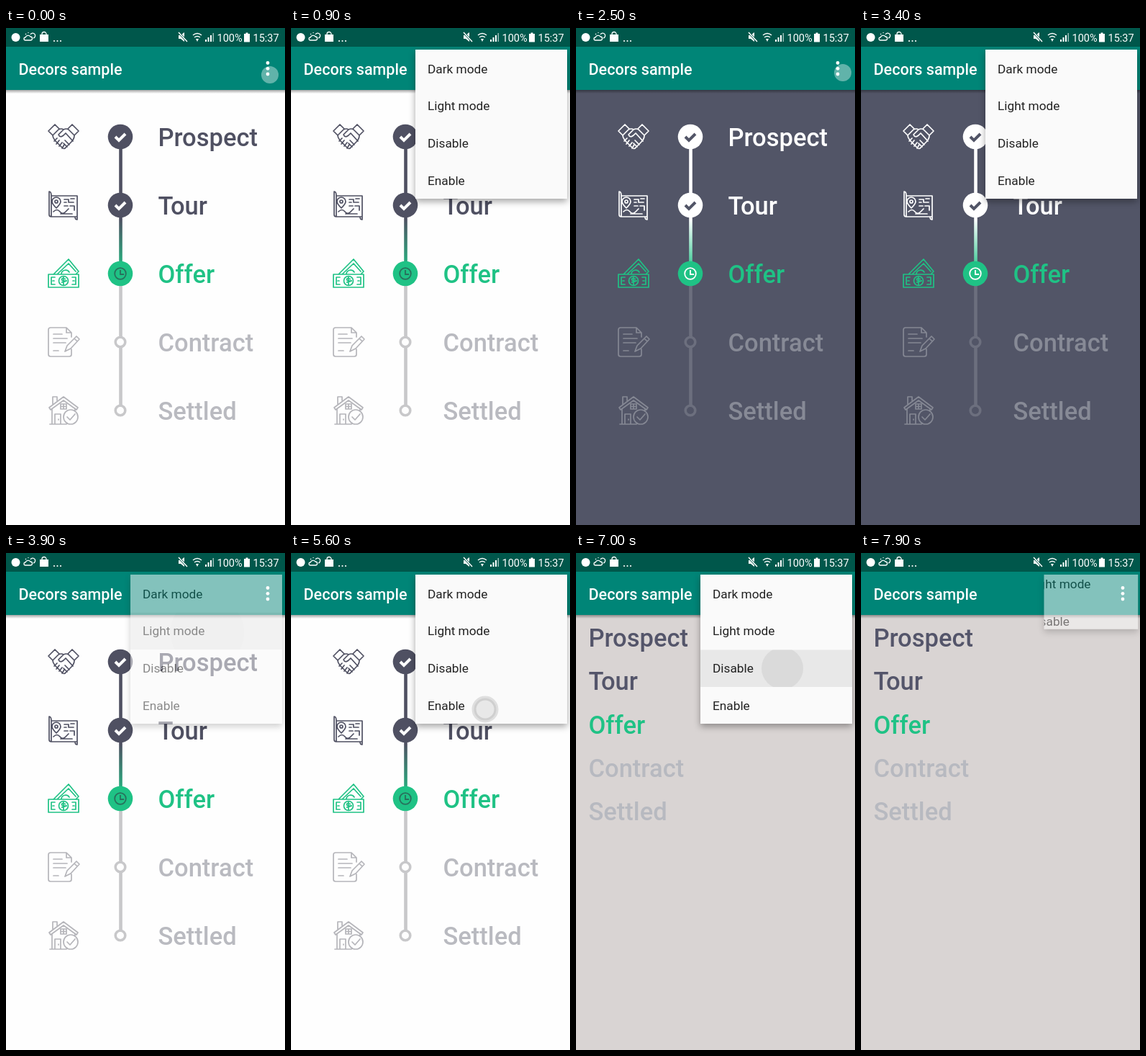
An HTML page that plays this animation: 388 by 690 pixels, repeating every 8000 ms.

```html
<!DOCTYPE html>
<html lang="en">
<head>
<meta charset="utf-8">
<title>Decors sample</title>
<style>
  html, body { margin: 0; width: 100%; height: 100%; overflow: hidden; }
  svg { display: block; width: 388px; height: 690px; font-family: Roboto, sans-serif; background: var(--bg); }
  .light { --bg: #fefefe; --fg: #4f5062; --check: #fff; --dim: #c8c8ca; --icon: #b5b5ba; --text: #b9bac0; --clock: #28705c; }
  .dark { --bg: #525567; --fg: #fff; --check: #525567; --dim: #6c6f7e; --icon: #858894; --text: #878a96; --clock: #fff; }
  .disabled { --bg: #d9d4d3; --fg: #54556a; --text: #b7b9c0; }
  .disabled #steps { display: none; }
  .label { font-size: 34.5px; font-weight: 500; }
  .icon { fill: none; stroke-width: 1.7; stroke-linejoin: round; stroke-linecap: round; }
  #menu { filter: drop-shadow(0 4px 5px rgba(0, 0, 0, .35)); }
  #items text { font-size: 17.25px; fill: #222; }
</style>
</head>
<body>
<svg id="stage" class="light" viewBox="0 0 388 690">
  <defs>
    <linearGradient id="blend" x2="0" y2="1">
      <stop offset=".2" stop-color="var(--fg)"/><stop offset="1" stop-color="#1fc285"/>
    </linearGradient>
    <linearGradient id="shade" x2="0" y2="1">
      <stop stop-opacity=".35"/><stop offset="1" stop-opacity="0"/>
    </linearGradient>
    <clipPath id="window"><rect id="frame" y="30"/></clipPath>
    <clipPath id="rowClip"><rect id="rowBox" x="173" width="211" height="51.75"/></clipPath>
  </defs>

  <g id="steps"></g>
  <g id="labels"></g>

  <rect y="86" width="388" height="5" fill="url(#shade)"/>
  <rect width="388" height="86" fill="#008577"/>
  <rect width="388" height="26" fill="#00574b"/>
  <text x="17.5" y="65" font-size="21.56" font-weight="500" fill="#fff">Decors sample</text>
  <g fill="#fff">
    <circle cx="364" cy="48.5" r="2.4"/><circle cx="364" cy="56.3" r="2.4"/><circle cx="364" cy="64" r="2.4"/>
    <circle cx="13.5" cy="13" r="6"/>
    <path d="M47 9h12v10h-12z"/>
    <path d="M50 10V8.500a3 3 0 0 1 6 0V10M27 17h7a2.500 2.500 0 0 0 0-5 4 4 0 0 0-7 1 2 2 0 0 0 0 4M34 9a3.500 3.500 0 1 1 4 5M27 8l1 1M31 6v1" fill="none" stroke="#fff" stroke-width="1.3"/>
    <circle cx="67" cy="18" r="1.1"/><circle cx="71.500" cy="18" r="1.1"/><circle cx="76" cy="18" r="1.1"/>
    <path d="M240 10h3l5-4v13l-5-4h-3z"/>
    <path d="M240 6l12 13" stroke="#00574b" stroke-width="3"/>
    <path d="M240 6l12 13M260 10q6-5 12 0M262 13q4-3 8 0" fill="none" stroke="#fff" stroke-width="1.4"/>
    <path d="M264 15h4l-2 4z"/>
    <path d="M277 19v-3h2v3zM280.500 19v-6h2v6zM284 19v-9h2v9z"/>
    <path d="M287.500 19V7h1.500v12z" opacity=".6"/>
    <path d="M331 8h2.500V6.500h3V8H339v11.500h-8z"/>
    <text x="293.500" y="18.500" font-size="14.5">100%</text>
    <text x="343.500" y="18.500" font-size="14.5">15:37</text>
  </g>

  <g id="menu">
    <g clip-path="url(#window)">
      <rect x="170" y="30" width="216" height="207" fill="#fafafa"/>
      <g id="items">
        <g id="press" clip-path="url(#rowClip)">
          <rect id="rowTint" x="173" width="211" height="51.75" opacity=".07"/>
          <circle id="ripple"/>
        </g>
      </g>
    </g>
  </g>
  <circle id="touch"/>
</svg>

<script>
const $ = id => document.getElementById(id);
const set = (el, attrs) => { for (const k in attrs) el.setAttribute(k, attrs[k]); };
const add = (parent, tag, attrs, text = '') => {
  const el = document.createElementNS('http://www.w3.org/2000/svg', tag);
  set(el, attrs);
  el.textContent = text;
  return parent.appendChild(el);
};
const ring = (x, y, r) => `M${x - r} ${y}a${r} ${r} 0 1 0 ${2 * r} 0a${r} ${r} 0 1 0 ${-2 * r} 0`;

const GREEN = '#1fc285', ROW = 51.75;
const steps = [
  ['Prospect', 'M-12-17L-21-8l6 6 9-9zM12-17L21-8l-6 6-9-9zM-7-10q4-2 7 0 4-2 7 0M-15-2c0 4 2 5 4 8l9 9q3 3 5 0M15-2c0 5-2 7-4 9l-8 8M0-10l-7 7q2 5 7 1l3-3 10 11M-13 6l4-4M-10 10l4-5M-6 13l4-5M-2 16l3-5M2 5l6 6M0 9l5 5'],
  ['Tour', 'M-17-13H19V16H-17zM-17-13q0-6-3-6V13q0 3 3 3M19-13V20q-3 0-3-4M-10 4q-6-6-6-9a6 6 0 0 1 12 0q0 3-6 9zM1-8h6v4h7M1-4h3M1 1h5M10-9h5M9 1h6v6M-14 9q5-5 9 0t9-1l3-3M-4 12h16' + ring(-10, -5, 2)],
  ['Offer', 'M-21 1H21V19H-21zM-17 5h5M12 5h5v10h-5M-17 5v10h5M-14 1L7-20 21-3 17 1M-8 0L7-14l10 11M-3 0a6 6 0 0 1 11-2M-15 10h2M13 10h2M2.500 7.500q-5-2-5 .5t5 2-5 2M0 5v10' + ring(0, 10, 6.5)],
  ['Contract', 'M11-7V-13L4-20H-18q-3 0-3 3V17q0 3 3 3H8q3 0 3-3V10M4-20v7h7M-14-11H-2M-14-5H5M-14 1H3M-14 12h7M2 13l3-8L18-8l4 4L10 9zM15-5l4 4'],
  ['Settled', 'M-20-4L0-19 20-4l-2 3L0-14-18-1zM-15-9v-10h6v5M-16-2V19H4M16-3V0M-12 19V5h8V19M-7 12v1M-4-9h8v7h-8zM0-9v7M-4-5.500h8M5 9l4 4 7-8M-19 19h4' + ring(10, 9, 10)]
];

const line = (y, h, fill) => add($('steps'), 'rect', { x: 157.2, y, width: 4.6, height: h, fill });
line(151, 95, 'var(--fg)');
line(246, 95, 'url(#blend)');
line(341, 190, 'var(--dim)');

const labels = steps.map(([name, icon], i) => {
  const y = 151 + 95 * i, done = i < 2, now = i === 2;
  const color = dim => done ? 'var(--fg)' : now ? GREEN : dim;
  const g = add($('steps'), 'g', { transform: `translate(159 ${y})` });
  add(g, 'path', { class: 'icon', d: icon, stroke: color('var(--icon)'), transform: 'translate(-79 0)' });
  if (i < 3) {
    add(g, 'circle', { r: 17.3, fill: color() });
    add(g, 'path', done
      ? { d: 'M-7 0l5 5 9-9', fill: 'none', stroke: 'var(--check)', 'stroke-width': 4 }
      : { d: ring(0, 0, 7.8) + 'M0-5V1H5', fill: 'none', stroke: 'var(--clock)', 'stroke-width': 1.8 });
  } else {
    add(g, 'circle', { r: 6.8, fill: 'var(--bg)', stroke: 'var(--dim)', 'stroke-width': 3.6 });
  }
  return add($('labels'), 'text', { class: 'label', fill: color('var(--text)') }, name);
});

['Dark mode', 'Light mode', 'Disable', 'Enable'].forEach((name, i) =>
  add($('items'), 'text', { x: 190, y: 62.7 + ROW * i }, name));

// Each visit to the menu: opening time, tap time, chosen row and tap point.
const visits = [
  { open: 150, tap: 1330, row: 0, x: 280, y: 58 },
  { open: 2600, tap: 3480, row: 1, x: 280, y: 110 },
  { open: 4700, tap: 5520, row: 3, x: 270, y: 217 },
  { open: 6250, tap: 6710, row: 2, x: 287, y: 160 },
  { open: 7850, tap: 9000, row: 0, x: 280, y: 58 }
];
const CLOSE = 350, FADE = 150;

function setMode(t) {
  const mode = t < 1640 ? 'light' : t < 3790 ? 'dark' : t < 6920 ? 'light' : 'disabled';
  if ($('stage').dataset.mode === mode) return;
  $('stage').dataset.mode = mode;
  $('stage').setAttribute('class', mode);
  const off = mode === 'disabled';
  labels.forEach((el, i) => set(el, off ? { x: 17.5, y: 130 + 60.3 * i } : { x: 211.5, y: 164 + 95 * i }));
}

function drawMenu(t) {
  const v = visits.find(v => t >= v.open && t < v.tap + CLOSE + FADE);
  $('menu').style.display = v ? '' : 'none';
  if (!v) return;
  const rest = (1 - Math.min(1, (t - v.open) / 250)) ** 2;
  const out = Math.max(0, (t - v.tap - CLOSE) / FADE);
  $('menu').style.opacity = (1 - .75 * rest) * (1 - out);
  const width = 211 * (1 - .6 * rest);
  set($('frame'), { x: 384 + 2 * rest - width, width, height: 207 * (1 - rest) });
  set($('items'), { transform: `translate(${68 * rest} ${-103 * rest})` });

  const held = t - v.tap - 120;
  $('press').style.display = held > 0 ? '' : 'none';
  const y = 30.800 + ROW * v.row;
  set($('rowBox'), { y });
  set($('rowTint'), { y });
  set($('ripple'), { cx: v.x, cy: v.y, r: Math.max(0, held * .17), opacity: .06 * Math.min(1, Math.max(0, 2 - held / 170)) });
}

function drawTouch(t) {
  const dots = visits.find(v => t >= v.open - 200 && t < v.open - 40);
  const item = visits.find(v => t >= v.tap && t < v.tap + 150);
  $('touch').style.display = dots || item ? '' : 'none';
  if (dots) {
    set($('touch'), { cx: t < 200 ? 367 : 371, cy: t < 200 ? 65 : 62, r: 12, fill: 'rgba(255,255,255,.38)', stroke: 'none' });
  } else if (item) {
    set($('touch'), { cx: item.x, cy: item.y, r: 15.5, fill: 'rgba(0,0,0,.07)', stroke: 'rgba(0,0,0,.11)', 'stroke-width': 6 });
  }
}

const start = performance.now();
function draw() {
  const t = Math.max(0, performance.now() - start) % 8000;
  setMode(t);
  drawMenu(t);
  drawTouch(t);
  requestAnimationFrame(draw);
}
draw();
</script>
</body>
</html>
```
